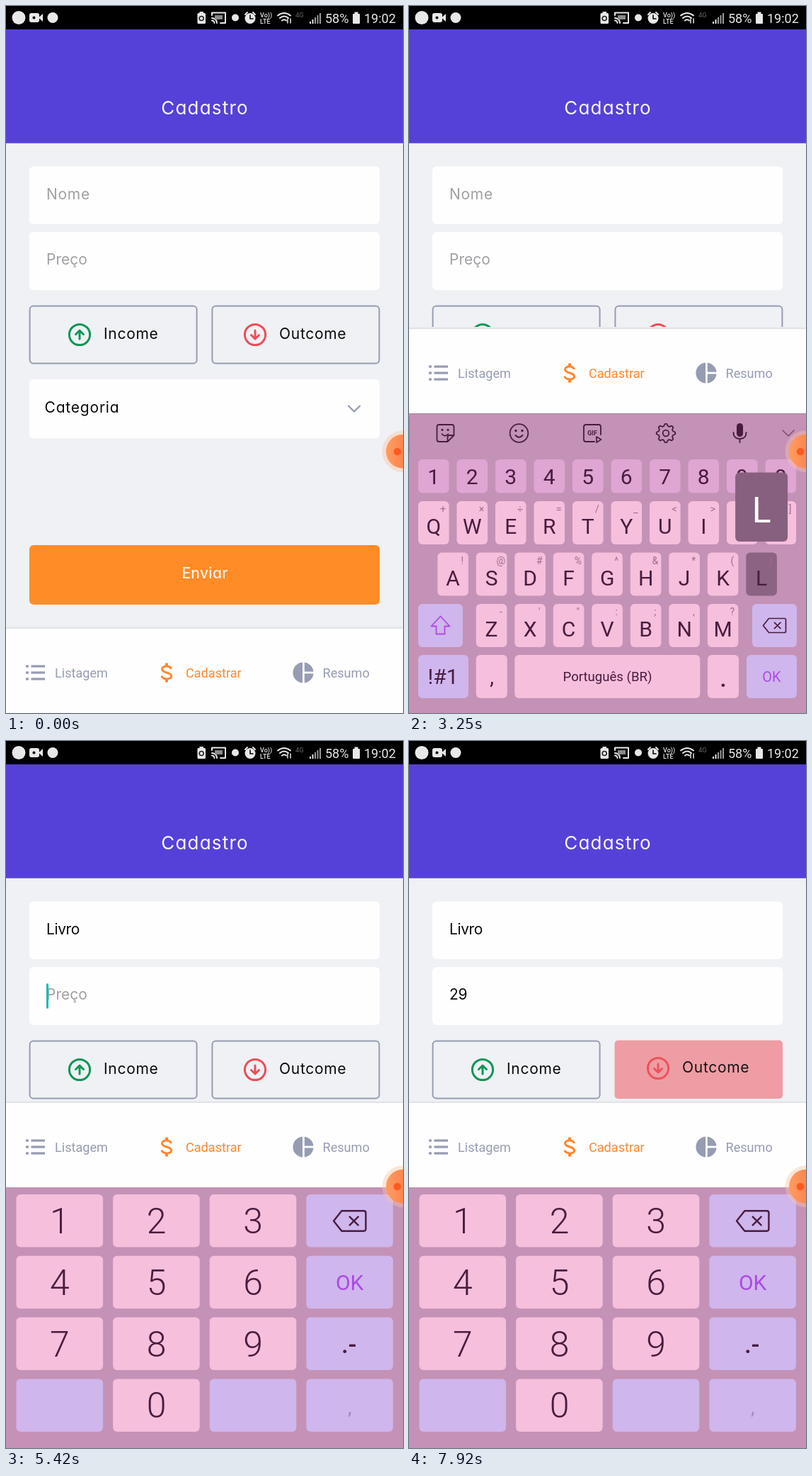
Recreate the animation shown at these times as an HTML page. Size 561x998 px, loop 8 s.

```html
<!DOCTYPE html>
<html lang="pt-BR">
<head>
<meta charset="utf-8">
<title>Cadastro</title>
<style>
  html, body { margin: 0; width: 100%; height: 100%; overflow: hidden; background: #f0f2f5; }
  svg { display: block; width: 100%; height: 100%; }
  text { font-family: Roboto, sans-serif; white-space: pre; }
  .app { font-family: Inter, sans-serif; font-size: 21px; font-feature-settings: "cv11"; }
  .line { fill: none; stroke-linecap: round; stroke-linejoin: round; }
</style>
</head>
<body>
<svg id="stage" viewBox="0 0 561 998" preserveAspectRatio="none"></svg>
<script>
const INK = '#481c3f', BOARD = '#c492b6', PINK = '#f6bfdc', MAUVE = '#dfa5d3',
  LILAC = '#cfb6ec', PRESSED = '#8c6382', VIOLET = '#ad49e2',
  GREY = '#969cb2', ORANGE = '#ff872c', WHITE = '#fefefe', TEAL = '#18b9b5';

const rect = (x, y, w, h, fill, r = 0, more = '') =>
  `<rect x="${x}" y="${y}" width="${w}" height="${h}" rx="${r}" fill="${fill}" ${more}/>`;
const disc = (x, y, r, fill, more = '') => `<circle cx="${x}" cy="${y}" r="${r}" fill="${fill}" ${more}/>`;
const ring = (x, y, r, color, w) => disc(x, y, r, 'none', `stroke="${color}" stroke-width="${w}"`);
const line = (d, color, w, more = '') => `<path class="line" d="${d}" stroke="${color}" stroke-width="${w}" ${more}/>`;
const shape = (d, fill) => `<path d="${d}" fill="${fill}"/>`;
const group = (id, body, more = '') => `<g id="${id}" ${more}>${body}</g>`;
const at = (x, y, body, scale = 1) => `<g transform="translate(${x} ${y}) scale(${scale})">${body}</g>`;
const text = (s, x, y, size, fill, more = '') =>
  `<text x="${x}" y="${y}" font-size="${size}" fill="${fill}" ${more}>${s}</text>`;
const mid = (s, x, y, size, fill, more = '') => text(s, x, y, size, fill, `text-anchor="middle" ${more}`);
const label = (s, x, y, fill, gap = 0, more = '') =>
  `<text class="app" x="${x}" y="${y}" fill="${fill}" letter-spacing="${gap}" ${more}>${s}</text>`;

function statusBar() {
  const c = '#e8e8e8';
  const bars = [0, 1, 2, 3, 4].map(i =>
    rect(429 + i * 3.5, 22 - i * 3, 2, 3 + i * 3, i < 2 ? c : '#9a9a9a')).join('');
  return rect(0, 0, 561, 33, '#000') +
    disc(18, 16.5, 9.5, c) +
    rect(33, 10, 14, 13, c, 3) + shape('M46 16.5L52 11V22Z', c) + disc(39.5, 16.5, 2, '#000') +
    disc(66, 16.5, 7.5, c) +
    rect(270.5, 10, 11.5, 15, c, 1.5) + rect(273.5, 8, 5.5, 3, c) + ring(276.2, 17.5, 3, '#222', 1.6) +
    line('M291 13V9.5H310V24H303M291 17A7 7 0 0 1 298 24M291 20.5A3.5 3.5 0 0 1 294.5 24', c, 2) +
    rect(295, 13, 11, 6, '#8a8a8a') +
    disc(324, 16.5, 5, c) +
    disc(345, 17.5, 7.5, c) + line('M345 13V18H349', '#000', 1.6) +
    line('M338 12L341 9M352 12L349 9', c, 2) +
    text('Vo))', 359, 15.5, 9, c, 'font-weight="500"') + text('LTE', 359, 24.5, 9, c, 'font-weight="500"') +
    line('M384 13.5Q393 6.5 402 13.5M387 17Q393 12 399 17M390 20.5Q393 18 396 20.5', c, 2) +
    line('M398 24V18M402 18V24', c, 1.5) +
    text('4G', 409, 15.5, 9.5, '#666') + bars +
    text('58%', 451, 24, 18, c) +
    rect(490, 11, 10, 14, c, 1) + rect(492.5, 8.5, 5, 3, c) +
    text('19:02', 506, 24, 18, c);
}

function choice(x, name, color, cx, dir) {
  return ring(cx, 464, 14.6, color, 3) +
    at(cx, 464, line('M0 6V-6M-5.5 -.5L0 -6L5.5 -.5', color, 3), `1 ${dir}`) +
    label(name, x, 469.5, '#0a0a0c', .7);
}

function page() {
  const border = `stroke="${GREY}" stroke-width="2"`;
  return rect(0, 33, 561, 965, '#eff1f4') +
    rect(0, 33, 561, 160.7, '#5541d7') +
    label('Cadastro', 281, 152.5, '#f8f8ff', 1.2, 'text-anchor="middle" style="font-size:26px"') +
    rect(33, 226.5, 495, 81.5, WHITE, 6) + rect(33, 319, 495, 82, WHITE, 6) +
    label('', 57, 272.5, '#000', 0, 'id="name"') + label('', 57, 365, '#000', 0, 'id="price"') +
    rect(57, 250, 3, 35, TEAL, 0, 'id="caret"') +
    rect(33.6, 423.5, 236, 81, 'none', 5, border) + choice(138, 'Income', '#0f9656', 104, 1) +
    group('outcome',
      rect(291.4, 423.5, 236, 81, 'none', 5, `id="frame" ${border}`) +
      rect(290.5, 422.5, 237.5, 82.5, '#f09aa1', 5, 'id="fill"') +
      group('inner', choice(386, 'Outcome', '#ef4c56', 352, -1))) +
    rect(33, 527, 495, 83.5, WHITE, 6) +
    label('Categoria', 54.5, 574, '#0a0a0c', .8) +
    line('M484 564.5L492 572.5L500 564.5', GREY, 2.4) +
    rect(33, 761, 495, 84, '#ff8c26', 6) +
    label('Enviar', 281, 808, '#f6f2ee', .3, 'text-anchor="middle" font-weight="500"');
}

// Tab bar, drawn with its top edge at y = 0
function tabs() {
  const rows = [-9, 0, 9].map(y =>
    rect(28, 60.3 + y, 4, 3.4, GREY, 1) + rect(35.5, 60.4 + y, 19.5, 3.2, GREY)).join('');
  const tab = (s, x, c) => text(s, x, 68.5, 18.1, c);
  return rect(0, -3, 561, 2, '#e9ebee') + rect(0, -1.5, 561, 1.5, '#dfe1e5') + rect(0, 0, 561, 120, WHITE) +
    rows + tab('Listagem', 69, GREY) +
    at(227, 62, line('M6.3 -5C5.5 -10 -6.5 -10.5 -6.5 -5C-6.5 1 6.7 -1 6.7 5C6.7 10.5 -6.5 10 -7 4.5', ORANGE, 3,
      'style="stroke-linecap:butt"') + rect(-2, -13.5, 4, 5, ORANGE) + rect(-2, 8.5, 4, 5, ORANGE)) +
    tab('Cadastrar', 254, ORANGE) +
    disc(420, 62, 14.6, GREY) + rect(419, 47, 2.8, 30, WHITE) + rect(420, 60.6, 16, 2.8, WHITE) +
    tab('Resumo', 447.5, GREY);
}

const eraser = line('M-16 0L-8 -10H14Q16 -10 16 -8V8Q16 10 14 10H-8ZM0 -4.2L8.4 4.2M8.4 -4.2L0 4.2', INK, 1.7);

function gear() {
  const pts = [];
  for (let i = 0; i < 32; i++) {
    const a = (i - 1.5) * Math.PI / 16, r = i % 4 === 1 || i % 4 === 2 ? 13.3 : 10.3;
    pts.push((r * Math.cos(a)).toFixed(1) + ' ' + (r * Math.sin(a)).toFixed(1));
  }
  return line('M' + pts.join('L') + 'Z', INK, 1.8) + ring(0, 0, 4.3, INK, 1.8);
}

function toolbar() {
  const face = line('M-5 3Q0 8.5 5 3', INK, 1.9) + disc(-4.5, -3.5, 1.7, INK) + disc(4.5, -3.5, 1.7, INK);
  return at(51.5, 603, line('M-9 -12H9Q12 -12 12 -9V3L3 12H-9Q-12 12 -12 9V-9Q-12 -12 -9 -12M12 3H6Q3 3 3 6V12', INK, 1.8) +
      at(-.5, -1.5, face, .9)) +
    at(155.5, 603, ring(0, 0, 12.8, INK, 1.8) + face) +
    at(259, 603, line('M3 12H-9Q-12 12 -12 9V-9Q-12 -12 -9 -12H9Q12 -12 12 -9V2', INK, 1.8) +
      mid('GIF', 0, 3, 9, INK, 'font-weight="700"') + line('M6 5L12.5 9L6 13Z', INK, 1.7)) +
    at(363, 603, gear()) +
    at(467.5, 603, rect(-4.5, -14, 9, 19, INK, 4.5) + line('M-9 -1Q-9 8 0 8Q9 8 9 -1M0 8V13', INK, 1.9)) +
    line('M528 599L536 607L544 599', '#7d4f72', 1.6);
}

const STEP = 54.5;
const ROWS = [
  { keys: 'QWERTYUIOP', x: 13, y: 699, hints: ['+', '×', '÷', '=', '/', '_', '&lt;', '&gt;', '[', ']'] },
  { keys: 'ASDFGHJKL', x: 40.3, y: 771.5, hints: ['!', '@', '#', '%', '^', '&amp;', '*', '(', ')'] },
  { keys: 'ZXCVBNM', x: 94.8, y: 844, hints: ['-', "'", '"', ':', ';', ',', '?'] }
];

function keyboard() {
  const digits = [...'1234567890'].map((d, i) =>
    rect(13 + i * STEP, 640, 43.6, 47.5, MAUVE, 6) + mid(d, 34.8 + i * STEP, 674.5, 30, INK)).join('');
  const letters = ROWS.map(row => [...row.keys].map((k, i) => {
    const x = row.x + i * STEP;
    return rect(x, row.y, 43.6, 61, PINK, 6, `id="key${k}"`) +
      mid(row.hints[i], x + 35, row.y + 16, 14, '#a06a90') +
      mid(k, x + 21.8, row.y + 46, 30, INK, 'data-letter');
  }).join('')).join('');
  return rect(0, 575, 561, 426, BOARD) + rect(0, 575, 561, 1, '#a97d9d') + rect(0, 580, 1, 50, '#94869b') +
    toolbar() + digits + letters +
    rect(13, 844, 63, 61, LILAC, 6) + rect(485, 844, 63, 61, LILAC, 6) +
    at(44.5, 874.5, line('M0 -13L13 1H6V12H-6V1H-13Z', INK, 1.8, 'id="shift"')) +
    at(516.5, 874.5, eraser) +
    rect(13, 916, 71, 61, LILAC, 6) + mid('!#1', 48, 957, 30, INK) +
    rect(94.8, 916, 44, 61, PINK, 6) + mid(',', 117, 957, 29, INK) +
    rect(149.3, 916, 262, 61, PINK, 6) + mid('Português (BR)', 280.5, 953, 18.6, INK) +
    rect(422, 916, 44, 61, PINK, 6) + mid('.', 444, 961, 34, INK, 'font-weight="500"') +
    rect(477, 916, 71, 61, LILAC, 6) + mid('OK', 512.5, 953.5, 20, VIOLET) +
    group('popup', rect(-37, -113, 74, 97.5, '#88607f', 6) + mid('', 0, -43, 50, '#fff', 'id="popText"'));
}

function numberPad() {
  const cells = [...'123<456k789-_0_,'].map((k, i) => {
    const x = 14.5 + i % 4 * 136.6, y = 640 + Math.floor(i / 4) * 86.8, cx = x + 61.4;
    const digit = k >= '0' && k <= '9';
    const face = digit ? mid(k, cx, y + 55, 50, INK, 'font-weight="300"')
      : k === '<' ? at(cx, y + 37.5, eraser, 1.42)
      : k === 'k' ? mid('OK', cx, y + 48, 30, VIOLET)
      : k === '-' ? mid('.-', cx - 1, y + 50, 35, INK, 'font-weight="500"')
      : k === ',' ? mid(',', cx, y + 50, 28, '#aa89bb') : '';
    return rect(x, y, 122.6, 74.5, digit ? PINK : LILAC, 6, digit ? `id="pad${k}"` : '') + face;
  }).join('');
  return rect(0, 630, 561, 368, BOARD) + cells;
}

const bubble = disc(561, 628.7, 29.5, '#ffc0a0', 'opacity=".42"') +
  disc(561, 628.7, 24, 'url(#glow)') + disc(553, 629, 5.3, '#fb5a20');

document.getElementById('stage').innerHTML =
  '<defs><linearGradient id="glow"><stop offset="0" stop-color="#ff9c5e"/><stop offset=".5" stop-color="#fd8650"/></linearGradient></defs>' +
  page() + rect(0, 575, 561, 423, WHITE, 0, 'id="gap"') + group('tabs', tabs()) +
  group('keyboard', keyboard()) + group('pad', numberPad()) + bubble + statusBar();

const el = id => document.getElementById(id);
const set = (id, attrs) => { for (const k in attrs) el(id).setAttribute(k, attrs[k]); };
const show = (id, on) => set(id, { visibility: on ? 'visible' : 'hidden' });
const within = (f, spans) => spans.some(([a, b]) => f >= a && f < b);
// Last value whose start has been reached
const pick = (f, steps) => steps.reduce((v, [from, next]) => f >= from ? next : v, steps[0][1]);
const letters = document.querySelectorAll('[data-letter]');

// Times below count twelfths of a second
const NAME = [[0, ''], [40, 'L'], [42, 'Li'], [43, 'Liv'], [45, 'Livr'], [46, 'Livro']];
const PRICE = [[0, ''], [67, '2'], [71, '29']];
const PRESS = [[0, ''], [39, 'L'], [40, ''], [41, 'I'], [42, 'V'], [43, ''], [44, 'R'], [45, 'O'], [46, '']];
const NAME_CARET = [[6, 11], [17, 24], [29, 36], [40, 53]];
const PRICE_CARET = [[54, 59], [65, 78], [84, 90]];
const FADE = [[0, 1], [91, .7], [92, .38], [93, .25], [94, .65], [95, .96]];
const TAB_TOP = [[0, 879], [24, 456], [58, 511]];
const SLIDE = [[0, 423], [22, 95], [23, 3], [24, 0]];

function field(id, value, hint, gap) {
  const node = el(id);
  node.textContent = value || hint;
  node.setAttribute('fill', value ? '#0a0a0c' : '#a0a0a4');
  node.setAttribute('letter-spacing', value ? -.4 : gap);
  return value ? 57 + node.getComputedTextLength() : 57;
}

function press(key, upper) {
  for (const row of ROWS) [...row.keys].forEach((k, i) => {
    set('key' + k, { fill: k === key ? PRESSED : PINK });
    if (k !== key) return;
    set('popup', { transform: `translate(${row.x + 21.8 + i * STEP} ${row.y})` });
    el('popText').textContent = upper ? k : k.toLowerCase();
  });
}

function draw(f) {
  const nameEnd = field('name', pick(f, NAME), 'Nome', .7);
  const priceEnd = field('price', pick(f, PRICE), 'Preço', 0);
  const onName = within(f, NAME_CARET), onPrice = within(f, PRICE_CARET);
  show('caret', onName || onPrice);
  set('caret', onName ? { x: nameEnd, y: 250 } : { x: priceEnd, y: 342.5 });

  const chosen = f >= 94;
  show('fill', chosen);
  show('frame', !chosen);
  set('inner', { transform: `translate(0 ${chosen ? -2 : 0})` });
  set('outcome', { opacity: pick(f, FADE) });

  const resizing = f === 22 || f === 23;
  show('gap', resizing || f === 57);
  show('tabs', !resizing);
  set('tabs', { transform: `translate(0 ${pick(f, TAB_TOP)})` });

  const typing = f >= 22 && f < 57, upper = f < 40, key = pick(f, PRESS);
  show('keyboard', typing);
  set('keyboard', { transform: `translate(0 ${pick(f, SLIDE)})` });
  show('popup', typing && key !== '');
  press(key, upper);
  letters.forEach(n => {
    n.textContent = upper ? n.textContent.toUpperCase() : n.textContent.toLowerCase();
  });
  set('shift', { stroke: upper ? VIOLET : INK });

  show('pad', f >= 57);
  set('pad2', { fill: f === 66 || f === 67 ? PRESSED : PINK });
  set('pad9', { fill: f === 70 ? PRESSED : PINK });
}

let last = -1;
function tick() {
  const t = performance.now() % 8000;
  const f = Math.min(95, Math.floor((t + 5) * 12 / 1000));
  if (f !== last) draw(last = f);
  requestAnimationFrame(tick);
}
tick();
</script>
</body>
</html>
```
